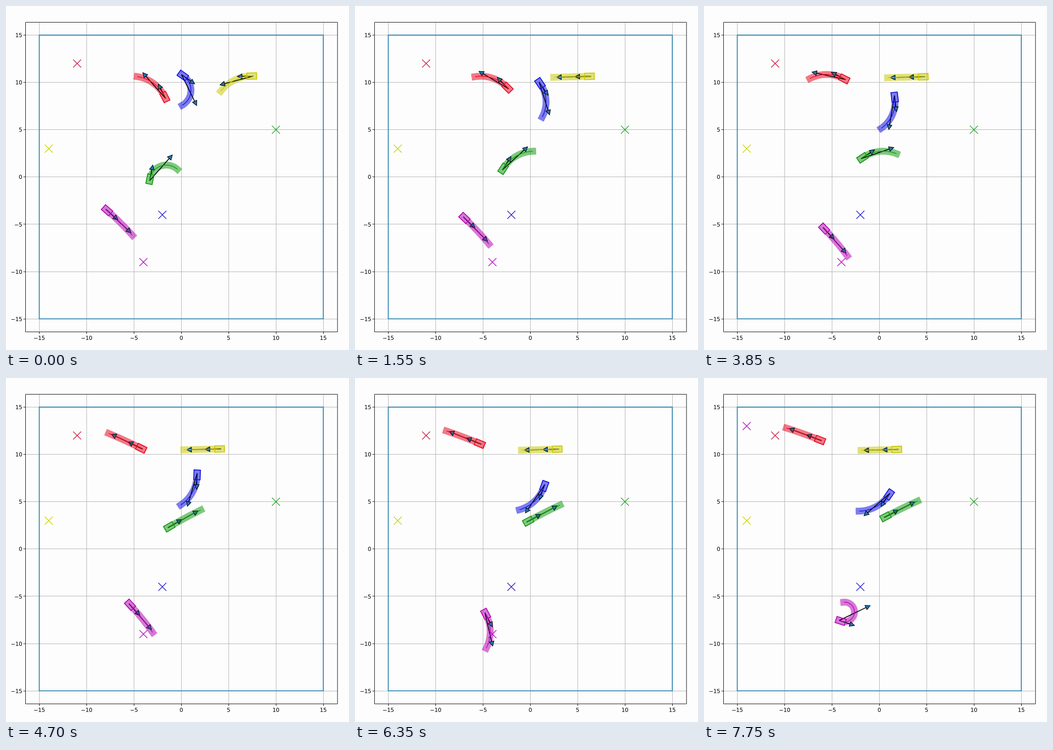
Recreate the animation shown at these times as an HTML page. Size 746 by 750 pixels, loop 8000 ms.

```html
<!DOCTYPE html>
<html lang="en">
<head>
<meta charset="utf-8">
<title>Vehicle motion planning</title>
<style>
  html, body { margin: 0; width: 100%; height: 100%; overflow: hidden; background: #fdfdfd; }
  svg { display: block; }
  text { font: 12px "DejaVu Sans", sans-serif; }
</style>
</head>
<body>
<svg width="746" height="750" viewBox="0 0 746 750" fill="none">
  <g id="axes"></g>
  <g id="scene"></g>
</svg>
<script>
const UNIT = 20.6, STEP = 0.2 * UNIT, HORIZON = 75.5, HALF_WIDTH = 7;
const AXLE = 5.5, CAP = 7.2, LOOP = 8000;
const stepTimes = [0, 50, 400, 700, 1000, 1250, 1550, 1850, 2150, 2450, 2750, 3000, 3300, 3550, 3850,
  4150, 4400, 4700, 4950, 5250, 5500, 5800, 6100, 6350, 6600, 6900, 7150, 7450, 7750];
const GOAL_SWITCH = 25;

// steering: [wheel angle in degrees, number of steps]
const cars = [
  { color: '#e8001c', x: 344.6, y: 196.6, heading: -117,
    steering: [[-14.5, 12], [-1, 2], [-14.5, 1], [-1, 5], [-14.5, 1], [-1, 8]] },
  { color: '#c8c800', x: 532.5, y: 152.8, heading: 178.5, steering: [[-13.5, 1], [0, 28]] },
  { color: '#0a0ae0', x: 386.3, y: 152.7, heading: 35.5, steering: [[28.5, 1], [16.5, 14], [14.5, 14]] },
  { color: '#0c980c', x: 313.4, y: 375.6, heading: -78.5, steering: [[29.8, 2], [14.5, 14], [1, 13]] },
  { color: '#b400b4', x: 221.3, y: 446.8, heading: 41.5,
    steering: [[1.8, 18], [14.5, 4], [0, 1], [14.5, 1], [0, 1], [-44, 4]] }
];
const goals = [[-11, 12, '#d0103a'], [-14, 3, '#cccc00'], [10, 5, '#22a022'], [-2, -4, '#1a10c8']];

const rad = deg => deg * Math.PI / 180;
const px = v => 381.2 + 20.59 * v;
const py = v => 372.8 - 20.62 * v;
const ahead = (p, along, side = 0) => ({
  x: p.x + along * Math.cos(p.a) - side * Math.sin(p.a),
  y: p.y + along * Math.sin(p.a) + side * Math.cos(p.a),
  a: p.a
});
const path = (points, attrs, closed) =>
  `<path d="M${points.map(p => p.x.toFixed(2) + ' ' + p.y.toFixed(2)).join('L')}${closed ? 'Z' : ''}" ${attrs}/>`;

function advance(pose, distance, steer) {
  const turn = distance * Math.tan(steer) / UNIT;
  const moved = ahead({ ...pose, a: pose.a + turn / 2 }, distance);
  return { ...moved, a: pose.a + turn };
}

for (const car of cars) {
  let pose = { x: car.x, y: car.y, a: rad(car.heading) };
  car.states = [];
  for (const [angle, count] of car.steering) {
    const steer = rad(angle);
    for (let i = 0; i < count; i++) {
      if (car.states.length) pose = advance(pose, STEP, steer);
      car.states.push({ pose, steer });
    }
  }
}

function arrow(from, angle, length) {
  const start = { ...from, a: angle }, base = length - 10.3;
  return path([start, ahead(start, base)], 'stroke="#000" stroke-width="1.8"') +
    path([ahead(start, length), ahead(start, base, 5.2), ahead(start, base, -5.2)],
      'fill="#1f77b4" stroke="#000" stroke-width="1.2"', true);
}

function drawCar({ color, states }, step) {
  const { pose, steer } = states[step];
  const axle = ahead(pose, -AXLE);
  const line = [axle, pose];
  for (let i = 0, n = 30; i < n; i++) line.push(advance(line[line.length - 1], HORIZON / n, steer));
  const spine = [ahead(axle, -CAP), ...line, ahead(line[line.length - 1], CAP)];
  const edge = side => spine.map(p => ahead(p, 0, side));
  const body = [[-12.7, -1], [8.5, -1], [8.5, 1], [-12.7, 1]].map(([u, s]) => ahead(pose, u, s * HALF_WIDTH));
  return path([...edge(HALF_WIDTH), ...edge(-HALF_WIDTH).reverse()],
      `fill="${color}" stroke="${color}" opacity=".52"`, true) +
    arrow(axle, pose.a, 35) + arrow(axle, pose.a + steer, 75) +
    path(line, `stroke="${color}" stroke-width="1.4"`) +
    path(body, `stroke="${color}" stroke-width="1.8"`, true);
}

function drawGoal([x, y, color]) {
  return `<path transform="translate(${px(x)} ${py(y)})" d="M-8.7-8.7 8.7 8.7M-8.7 8.7 8.7-8.7" stroke="${color}" stroke-width="1.4"/>`;
}

function drawAxes() {
  let grid = '', ticks = '', labels = '';
  for (let v = -15; v <= 15; v += 5) {
    const x = Math.floor(px(v)) + 0.5, y = Math.floor(py(v)) + 0.5;
    const label = String(v).replace('-', '\u2212');
    grid += `M${x} 35.5V710.5M42.5 ${y}H721`;
    ticks += `M${x} 710.5v4.5M42.5 ${y}h-4.5`;
    labels += `<text x="${px(v)}" y="728" text-anchor="middle" fill="#000">${label}</text>` +
      `<text x="35.5" y="${py(v) + 4.6}" text-anchor="end" fill="#000">${label}</text>`;
  }
  return `<path d="${grid}" stroke="#b0b0b0"/>
    <path d="M${px(-15)} ${py(15)}H${px(15)}V${py(-15)}H${px(-15)}Z" stroke="#1f7ba8" stroke-width="1.8"/>
    <path d="${ticks}M42.5 35.5H721V710.5H42.5Z" stroke="#000"/>${labels}`;
}

document.getElementById('axes').innerHTML = drawAxes();
const scene = document.getElementById('scene');
const start = performance.now();
let shown = -1;

function render() {
  const t = (performance.now() - start) % LOOP;
  const step = stepTimes.filter(s => s <= t).length - 1;
  if (step !== shown) {
    const target = step < GOAL_SWITCH ? [-4, -9, '#b400c4'] : [-14, 13, '#9a10b4'];
    scene.innerHTML = cars.map(car => drawCar(car, step)).join('') + [...goals, target].map(drawGoal).join('');
    shown = step;
  }
  requestAnimationFrame(render);
}
render();
</script>
</body>
</html>
```
